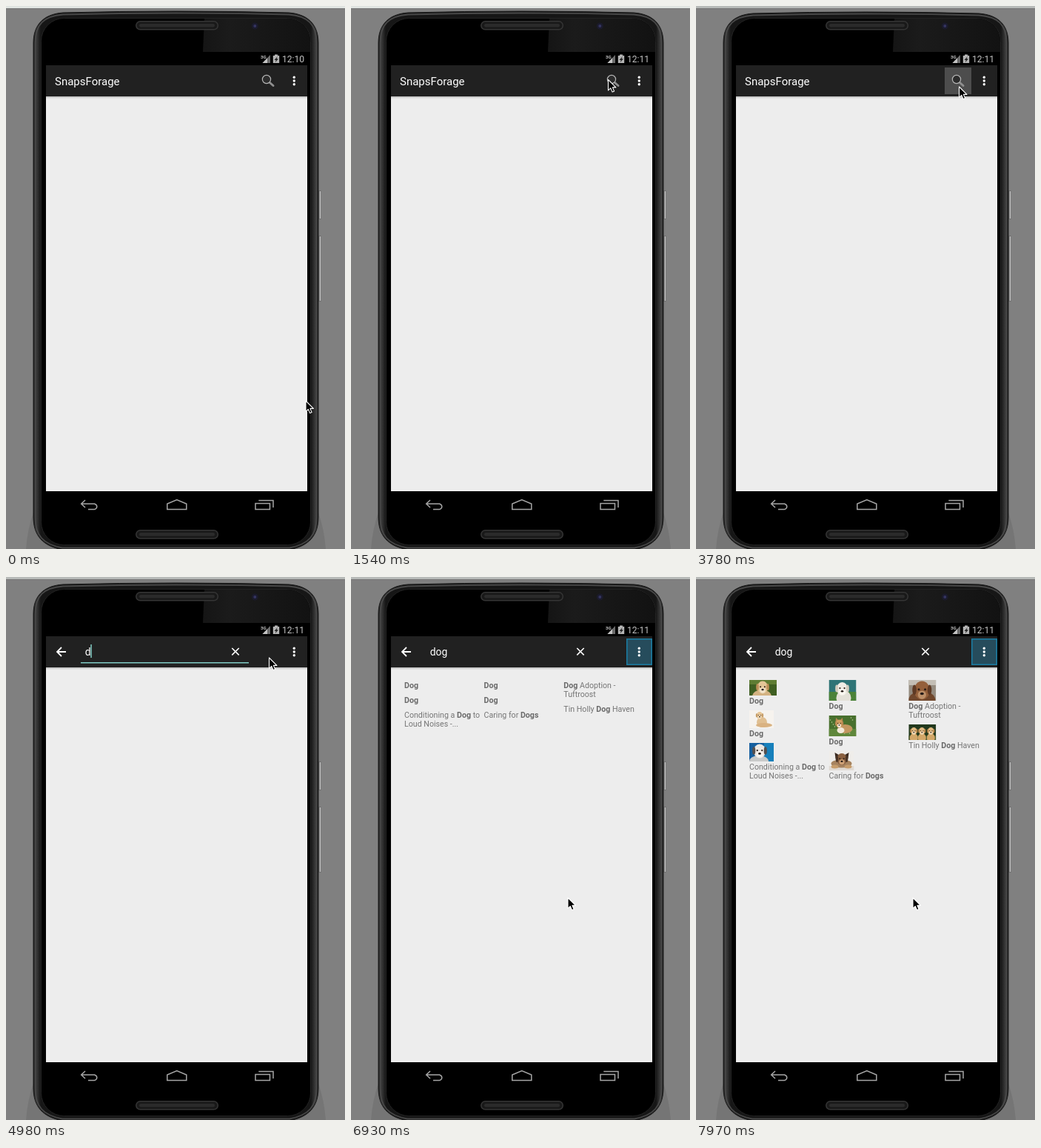
Recreate the animation shown at these times as an HTML page. Size 458x733 px, loop 8000 ms.

```html
<!DOCTYPE html>
<html lang="en">
<head>
<meta charset="utf-8">
<title>Phone image search</title>
<style>
html, body { margin: 0; width: 100%; height: 100%; overflow: hidden; background: #808080; }
svg { display: block; }
#stage { width: 458px; height: 733px; }
text { font-family: Roboto, sans-serif; white-space: pre; }
.label { font-size: 10.65px; fill: #757575; }
.label .b { font-weight: 700; fill: #6a6a6a; }
</style>
</head>
<body>
<svg id="stage" viewBox="0 0 458 733" xmlns="http://www.w3.org/2000/svg">
  <defs>
    <linearGradient id="rim" x1="0" x2="1" y1="0" y2="0">
      <stop offset="0" stop-color="#151515"/>
      <stop offset=".01" stop-color="#3c3c3c"/>
      <stop offset=".026" stop-color="#161616"/>
      <stop offset=".974" stop-color="#161616"/>
      <stop offset=".99" stop-color="#3c3c3c"/>
      <stop offset="1" stop-color="#151515"/>
    </linearGradient>
    <linearGradient id="glare" x1="0" x2="1" y1="0" y2="0">
      <stop offset="0" stop-color="#151515"/>
      <stop offset=".25" stop-color="#1b1b1b"/>
      <stop offset="1" stop-color="#121212"/>
    </linearGradient>
    <linearGradient id="drop" x1="0" x2="0" y1="0" y2="1">
      <stop offset="0" stop-color="#000" stop-opacity=".22"/>
      <stop offset="1" stop-color="#000" stop-opacity="0"/>
    </linearGradient>
    <clipPath id="face"><rect x="48" y="17" width="363" height="710" rx="31"/></clipPath>
  </defs>

  <rect width="458" height="733" fill="#808080"/>
  <rect id="strip" width="458" height="3"/>
  <rect y="3" width="458" height="1" fill="#777"/>
  <path d="M37 684Q29 706 27 733H80L60 684ZM422 684Q430 706 432 733H379L399 684Z" fill="#757575"/>

  <!-- body -->
  <g fill="#6e6e6e">
    <rect x="421" y="249" width="5" height="39" rx="1"/>
    <rect x="421" y="310" width="5" height="89" rx="1"/>
  </g>
  <path d="M424.5 250V287M424.5 311V398" stroke="#c4c4c4" stroke-width="1.4"/>
  <path id="shell" fill="url(#rim)" stroke="#1c1c1c"/>
  <path id="edge" fill="none" stroke="#484848" stroke-width="1.8"/>
  <rect x="47.5" y="16.5" width="364" height="711" rx="31" fill="#000" stroke="#232323"/>
  <path d="M268 17H411V62H266Z" fill="url(#glare)" clip-path="url(#face)"/>
  <g fill="#191919" stroke="#353535" stroke-width="1.5">
    <rect x="175.8" y="20.8" width="110.5" height="11" rx="5.5"/>
    <rect x="175.8" y="707.8" width="110.5" height="11" rx="5.5"/>
  </g>
  <g fill="#2b2b2b">
    <rect x="180" y="24" width="102" height="4.5" rx="2.2"/>
    <rect x="180" y="711" width="102" height="4.5" rx="2.2"/>
  </g>
  <circle cx="336.3" cy="27" r="4.5" fill="#1b1b2c"/>
  <circle cx="336.3" cy="27" r="2" fill="#343460"/>

  <!-- screen -->
  <rect x="54" y="62" width="353" height="630" fill="#000"/>
  <rect x="54" y="122" width="353" height="533" fill="#ededed"/>
  <rect x="54" y="122" width="353" height="3" fill="url(#drop)"/>
  <rect x="54" y="80" width="353" height="42" fill="#212121"/>
  <g fill="#c4c4c4">
    <text x="344" y="70.5" font-size="6.2" font-weight="700">3G</text>
    <path d="M357 66V77H346.5Z" fill="#6c6c6c"/>
    <path d="M353 70.2V77H346.5Z"/>
    <path d="M363 65.5H367V67H369.2V77H360.8V67H363Z" fill="#b5b5b5"/>
    <path d="M366.8 68L362.5 73H364.8L363.7 76.2L368 71.2H365.6Z" fill="#222"/>
    <text id="clock" x="373" y="76" font-size="12.1"></text>
  </g>
  <g fill="none" stroke="#a6a6a6" stroke-width="1.5">
    <path d="M107 667L101.7 672L107 677M102 672H119.5A4.8 4 0 0 1 119.5 679.6H111"/>
    <path d="M217.8 679.5V672L230.8 666.6L243.8 672V679.5Z"/>
    <path d="M337 671.6H356.5V679.6H337ZM341.3 667.5H361V677"/>
  </g>

  <g id="home">
    <rect id="press" x="336" y="83" width="36" height="36" fill="#4d4d4d"/>
    <text x="66" y="106.5" font-size="15" fill="#fff">SnapsForage</text>
    <path d="M356.5 103.5L361 107.5" stroke="#8e8e8e" stroke-width="3" stroke-linecap="round"/>
    <circle cx="352" cy="99" r="5.6" fill="#2c2c2c" stroke="#b5b5b5" stroke-width="1.2"/>
  </g>
  <g id="search">
    <path d="M81 101H69.5M75 95L69 101L75 107" fill="none" stroke="#fff" stroke-width="1.8"/>
    <text id="query" x="106.7" y="105.8" font-size="13.9" fill="#fff"></text>
    <path id="clear" d="M305.3 96L314.7 105.4M314.7 96L305.3 105.4" stroke="#fff" stroke-width="1.6"/>
    <g id="field" fill="#80cbc4">
      <rect x="101" y="115" width="227" height="1.5"/>
      <rect id="caret" y="91" width="1.5" height="18"/>
    </g>
    <rect id="focus" x="372.8" y="83.8" width="33.4" height="34.4" fill="#264c5c" stroke="#1b7ba0" stroke-width="1.6"/>
  </g>
  <g fill="#fff">
    <circle cx="389.3" cy="96.2" r="1.7"/>
    <circle cx="389.3" cy="101" r="1.7"/>
    <circle cx="389.3" cy="105.8" r="1.7"/>
  </g>

  <g id="results"></g>
  <path id="pointer" d="M0 0V14.4L3.3 11.4L5.6 16.6L8.1 15.5L5.9 10.4H10.4Z" fill="#000" stroke="#fff" stroke-width="1.1" stroke-linejoin="round"/>
</svg>
<script>
const LOOP = 8000;
const $ = id => document.getElementById(id);
const show = (id, on) => $(id).setAttribute('display', on ? 'inline' : 'none');

// Latest value of a [time, value] list
const stepAt = (list, t) => list.reduce((v, [at, next]) => t >= at ? next : v, list[0][1]);

const pointerPath = [
  [0, [405, 533]], [800, [370.5, 357]], [950, [371.5, 248.5]], [1100, [352, 181]],
  [1240, [334.5, 135.5]], [1390, [340, 106.5]], [1540, [347.5, 99.5]],
  [3180, [349, 102.5]], [3330, [355, 108]], [3480, [355.5, 109]],
  [6630, [323, 256.5]], [6780, [292.5, 428]], [6930, [293, 433]]
];
const typed = [[0, ''], [4980, 'd'], [5430, 'do'], [5580, 'dog']];
const carets = [107, 114.3, 121.2, 129];
const fades = [
  [[0, 0], [7530, .55], [7680, 1]],
  [[0, 0], [7680, .3], [7820, .68], [7970, 1]]
];

const rect = (x, y, w, h, c) => `<rect x="${x}" y="${y}" width="${w}" height="${h}" fill="${c}"/>`;
const oval = (x, y, rx, ry, c) => `<ellipse cx="${x}" cy="${y}" rx="${rx}" ry="${ry}" fill="${c}"/>`;

function head(x, y, r, fur, ear, muzzle) {
  const pair = (dx, dy, rx, ry, c) => oval(x - dx * r, y + dy * r, rx * r, ry * r, c) + oval(x + dx * r, y + dy * r, rx * r, ry * r, c);
  return oval(x, y, .85 * r, r, fur) + pair(.82, -.05, .22, .55, ear) + oval(x, y + .48 * r, .45 * r, .45 * r, muzzle) +
    pair(.34, -.1, .12, .12, '#2a1c14') + oval(x, y + .36 * r, .2 * r, .14 * r, '#241a16');
}

const photos = {
  golden: rect(0, 0, 37, 21, '#3f5f22') + rect(0, 0, 37, 6, '#5f7d33') + oval(17, 22, 13, 9, '#d3b282') +
    head(18, 10, 8.5, '#e3c696', '#bd9059', '#f1e2c8'),
  sitting: rect(0, 0, 33, 24, '#f6f3ee') + oval(17, 16, 7, 7, '#e0bf91') + oval(20, 20, 11, 3, '#d9b281') +
    head(14, 7, 5, '#e6c595', '#c39a64', '#f3dfc0'),
  blue: rect(0, 0, 33, 25, '#155f9f') + rect(20, 0, 13, 25, '#1780bb') + oval(13, 25, 13, 8, '#c9cac9') +
    head(14, 11, 9.5, '#ece8e3', '#55504e', '#f9f4ee'),
  white: rect(0, 0, 37, 28, '#2f7476') + rect(0, 16, 37, 12, '#4b8238') + oval(20, 24, 10, 10, '#e4e1d8') +
    head(18, 12, 9, '#f0ede5', '#d3ccbd', '#fbf8f1'),
  meadow: rect(0, 0, 37, 28, '#48702e') + rect(0, 18, 37, 10, '#5f873b') +
    Array.from({length: 14}, (_, i) => oval(i * 13 % 37, 3 + i * 9 % 24, .8, .8, '#b9c894')).join('') +
    oval(22, 18, 10, 6, '#c2965f') + oval(16, 20, 5, 4, '#f2e9d9') +
    '<path d="M9 10L9.5 3L14 7L18.5 3L19 10Z" fill="#b58750"/>' + head(14, 11, 5.5, '#cf9e60', '#b58750', '#f6eee0'),
  resting: rect(0, 0, 34, 26, '#efedea') + rect(0, 20, 34, 6, '#e0dad3') + oval(17, 17, 14, 5.5, '#a6835f') +
    oval(8, 21, 5, 2.5, '#c79d6c') + oval(26, 21, 5, 2.5, '#c79d6c') +
    '<path d="M9 10L8 2L15 6L20 6L27 2L26 10Z" fill="#3a2a20"/>' + head(17.5, 11, 8, '#8a6040', '#4a3425', '#cfa277'),
  russet: rect(0, 0, 37, 28, '#958c80') + rect(0, 0, 37, 7, '#c3beb5') + oval(18, 27, 18, 12, '#70472c') +
    head(18, 14, 12.5, '#945f3a', '#5f3a24', '#bd9069'),
  trio: rect(0, 0, 37, 21, '#22391d') + rect(0, 15, 37, 6, '#4c5a2c') +
    [7, 18, 30].map(x => oval(x, 18, 5.5, 6, '#d2a768') + head(x, 9, 5, '#e0ba82', '#b78448', '#f0dbb8')).join('')
};

// Masonry columns: photo, width, height, fade batch, text lines (* marks bold)
const columns = [
  [72, [['golden', 37, 21, 0, ['*Dog*']], ['sitting', 33, 24, 0, ['*Dog*']],
    ['blue', 33, 25, 1, ['Conditioning a *Dog* to', 'Loud Noises -...']]]],
  [179.5, [['white', 37, 28, 0, ['*Dog*']], ['meadow', 37, 28, 0, ['*Dog*']],
    ['resting', 34, 26, 1, ['Caring for *Dogs*']]]],
  [287.3, [['russet', 37, 28, 0, ['*Dog* Adoption -', 'Tuftroost']],
    ['trio', 37, 21, 1, ['Tin Holly *Dog* Haven']]]]
];

const bold = s => s.replace(/\*(.+?)\*/g, '<tspan class="b">$1</tspan>');
const cards = columns.map(([x, items]) => items.map(([name, w, h, batch, lines]) => {
  const g = document.createElementNS('http://www.w3.org/2000/svg', 'g');
  g.innerHTML = `<svg x="${x}" width="${w}" height="${h}">${photos[name]}</svg>` +
    lines.map(s => `<text class="label" x="${x}">${bold(s)}</text>`).join('');
  $('results').append(g);
  return {pic: g.firstChild, texts: [...g.querySelectorAll('text')], h, batch};
}));

function layout(t) {
  for (const column of cards) {
    let y = 139;
    for (const {pic, texts, h, batch} of column) {
      const alpha = stepAt(fades[batch], t);
      pic.setAttribute('y', y);
      pic.setAttribute('opacity', alpha);
      if (alpha) y += h;
      texts.forEach((line, i) => line.setAttribute('y', y + 11 + i * 12));
      y += 8 + texts.length * 12;
    }
  }
}

function shell(top, inset) {
  const l = 37 + inset, r = 422 - inset, y = top + inset;
  return `M${l} 50C${l} 25 51 ${y + 4} 77 ${y + 2}Q230 ${y - 2} 382 ${y + 2}C408 ${y + 4} ${r} 25 ${r} 50` +
    `V690C${r} 715 409 ${729 - inset} 383 ${734 - inset}H76C50 ${729 - inset} ${l} 715 ${l} 690Z`;
}

function draw(t) {
  const active = t < 2280, searching = t >= 3930, typing = t < 6180;
  const top = active ? 7 : 8;
  $('strip').setAttribute('fill', active ? '#e0e4e1' : '#b7bab8');
  $('shell').setAttribute('d', shell(top, 0));
  $('edge').setAttribute('d', shell(top, 2.5));
  $('clock').textContent = t < 500 ? '12:10' : '12:11';

  const query = stepAt(typed, t);
  show('home', !searching);
  show('press', t >= 3780);
  show('search', searching);
  show('clear', query);
  show('field', typing);
  show('focus', !typing);
  $('query').textContent = query;
  $('caret').setAttribute('x', carets[query.length]);

  show('results', t >= 6930);
  layout(t);
  $('pointer').setAttribute('transform', `translate(${stepAt(pointerPath, t)})`);
}

const start = performance.now();
function tick() {
  draw((performance.now() - start) % LOOP);
  requestAnimationFrame(tick);
}
tick();
</script>
</body>
</html>
```
